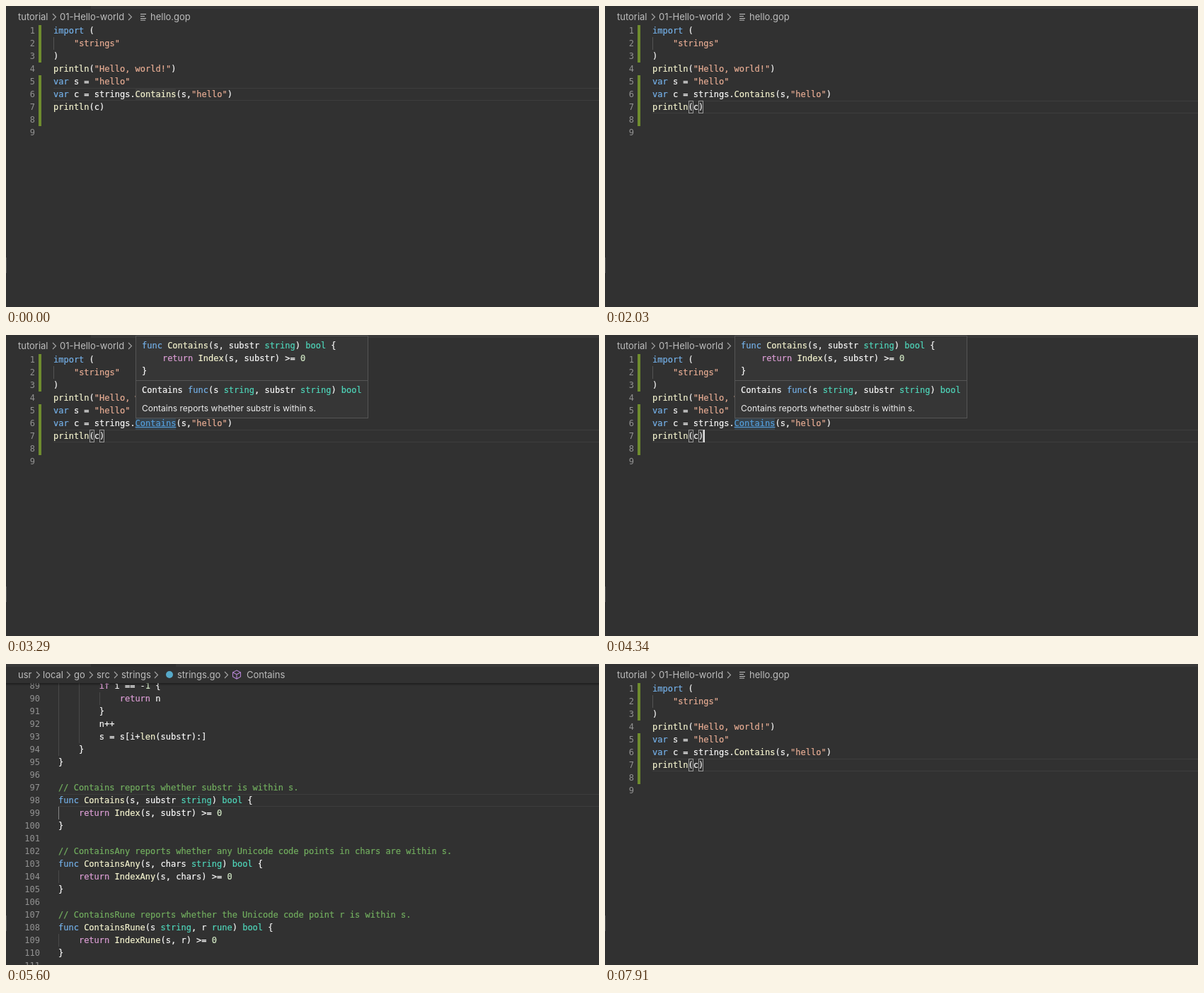
An HTML page that plays this animation: 838x426 px, repeating every 8.26 s.

```html
<!DOCTYPE html>
<html lang="en">
<head>
<meta charset="utf-8">
<title>Go to definition</title>
<style>
  html, body { margin: 0; width: 100%; height: 100%; overflow: hidden; background: #313131; }
  #stage { position: relative; width: 838px; height: 426px; overflow: hidden; background: #313131; color: #f8f8f8; }
  #stage div, #stage svg { position: absolute; }
  .line, .num { font: 12px/18px "DejaVu Sans Mono", "Liberation Mono", monospace; white-space: pre; height: 18px; }
  .line { -webkit-text-stroke: .2px; }
  .num { color: #929292; text-align: right; width: 40px; }
  .kw { color: #74b0e8; } .str { color: #e8ad94; } .fn { color: #f5f4cf; } .type { color: #4fd6ba; }
  .ctl { color: #db9dd4; } .val { color: #cfe5c2; } .com { color: #72ae5f; }
  .ui { font: 13px/18px Inter, "Open Sans", sans-serif; white-space: pre; color: #bdbdbd; }
  .link .target { color: #559fdc; text-decoration: underline; }
  .full { left: 0; top: 0; width: 838px; height: 426px; }
  .guide { width: 1px; background: #494949; }
  .bar { left: 46px; width: 4px; background: #6f8c2e; }
  #row { right: 0; height: 16px; border: solid #3d3d3d; border-width: 1px 0; }
  #word { left: 183px; top: 116px; width: 57px; height: 18px; }
  #caret { width: 2px; height: 18px; background: #dcdcdc; }
  .pair { top: 134px; width: 5px; height: 16px; border: 1px solid #9a9a9a; }
  #hover { left: 183px; top: 1px; width: 327px; height: 115px; background: #363636; border: 1px solid #555; }
  #head { left: 0; top: 0; width: 838px; height: 27px; background: #313131; }
  #shade { left: 0; top: 27px; width: 838px; height: 4px; background: linear-gradient(#0006, #0000); }
  .tab { top: 0; height: 4px; background: #3a3a3a; }
  #progress { top: 1px; width: 25px; height: 3px; background: #4b7ea6; }
  #edge { left: 0; top: 356px; width: 1px; height: 22px; background: #555; }
</style>
</head>
<body>
<div id="stage">
  <div id="row"></div>
  <div id="word"></div>
  <div id="hello" class="full">
    <div id="bars"><div class="bar" style="top:26px;height:54px"></div><div class="bar" style="top:98px;height:72px"></div></div>
    <div id="pairs"><div class="pair" style="left:118px"></div><div class="pair" style="left:132px"></div></div>
  </div>
  <div id="lib" class="full"></div>
  <div id="caret"></div>
  <div id="head">
    <div id="tabHello" class="full"></div>
    <div id="tabLib" class="full"></div>
    <div id="crumbHello" class="full"></div>
    <div id="crumbLib" class="full"></div>
    <div id="crumbFn" class="full"></div>
  </div>
  <div id="shade"></div>
  <div id="progress"></div>
  <div id="hover"></div>
  <div id="edge"></div>
</div>
<script>
const LOOP = 8260, CHAR = 7.224, ROW = 18;
const $ = id => document.getElementById(id);

const helloCode = `import (
    "strings"
)
println("Hello, world!")
var s = "hello"
var c = strings.Contains(s,"hello")
println(c)

`;

const libCode = `        if i == -1 {
            return n
        }
        n++
        s = s[i+len(substr):]
    }
}

// Contains reports whether substr is within s.
func Contains(s, substr string) bool {
    return Index(s, substr) >= 0
}

// ContainsAny reports whether any Unicode code points in chars are within s.
func ContainsAny(s, chars string) bool {
    return IndexAny(s, chars) >= 0
}

// ContainsRune reports whether the Unicode code point r is within s.
func ContainsRune(s string, r rune) bool {
    return IndexRune(s, r) >= 0
}
`;

const rules = [
  ["com", "\\/\\/.*"], ["str", '"[^"]*"'], ["kw", "\\b(?:import|var|func)\\b"],
  ["ctl", "\\b(?:if|return)\\b"], ["type", "\\b(?:string|bool|rune)\\b"],
  ["fn", "\\b\\w+(?=\\()"], ["val", "\\b\\d+\\b"]
];
const lexer = new RegExp(rules.map(([name, re]) => `(?<${name}>${re})`).join("|"), "g");

function paint(text) {
  return text.replace(/>/g, "\u0001").replace(lexer, (m, ...rest) => {
    const groups = rest[rest.length - 1];
    const name = rules.find(([n]) => groups[n] !== undefined)[0];
    return `<span class="${name}">${m}</span>`;
  }).replace(/\u0001/g, "&gt;");
}

function add(parent, cls, left, top, html = "", css = "") {
  const el = document.createElement("div");
  el.className = cls;
  el.style.cssText = `left:${left}px;top:${top}px;${css}`;
  el.innerHTML = html;
  parent.append(el);
  return el;
}

function addCode(parent, code, first, top, numRight, left) {
  code.split("\n").forEach((text, i) => {
    const y = top + i * ROW;
    add(parent, "num", numRight - 40, y, first + i);
    add(parent, "line", left, y, paint(text));
  });
}

const guide = (parent, x, from, rows, color = "") =>
  add(parent, "guide", x, from, "", `height:${rows * ROW}px;` + (color && `background:${color}`));

// Editor pages
addCode($("hello"), helloCode, 1, 26, 41, 67);
guide($("hello"), 67, 44, 1, "#555");
const target = [...$("hello").querySelectorAll(".fn")].find(e => e.textContent === "Contains");
target.classList.add("target");

const lineTop = n => n < 20 ? 26 + (n - 1) * ROW : 166 + (n - 97) * ROW;
addCode($("lib"), libCode, 89, lineTop(89), 48, 74);
guide($("lib"), 74, lineTop(89), 6);
guide($("lib"), 103, lineTop(89), 5);
guide($("lib"), 132, lineTop(90), 1);
guide($("lib"), 74, lineTop(99), 1, "#858585");
guide($("lib"), 74, lineTop(104), 1);
guide($("lib"), 74, lineTop(109), 1);

// Breadcrumbs
const svg = (x, y, w, h, color, d) =>
  `<svg style="left:${x}px;top:${y}px" width="${w}" height="${h}" fill="none" stroke="${color}" stroke-width="1.1"><path d="${d}"/></svg>`;
const label = (parent, x, text) => add(parent, "ui", x, 6, text);
const arrow = (parent, x) => parent.insertAdjacentHTML("beforeend", svg(x - 3, 10, 7, 11, "#a8a8a8", "M1 1L5.5 5.5L1 10"));

function crumbs(parent, names, arrows) {
  names.forEach(([x, text]) => label(parent, x, text));
  arrows.forEach(x => arrow(parent, x));
}
crumbs($("crumbHello"), [[17, "tutorial"], [76, "01-Hello-world"], [204, "hello.gop"]], [68, 175]);
$("crumbHello").insertAdjacentHTML("beforeend",
  svg(189, 10, 10, 11, "#c4c4c4", "M1 1.5H9M1 4.5H7M1 7.5H9M1 10H8"));
crumbs($("crumbLib"), [[17, "usr"], [52, "local"], [96, "go"], [128, "src"], [163, "strings"], [242, "strings.go"]],
  [45, 88, 120, 155, 212]);
add($("crumbLib"), "", 226, 10, "", "width:10px;height:10px;border-radius:50%;background:#56a9c9");
crumbs($("crumbFn"), [[340, "Contains"]], [311]);
$("crumbFn").insertAdjacentHTML("beforeend",
  svg(319, 8, 14, 14, "#b283d0", "M7 1L12.5 3.8V10L7 13L1.5 10V3.8ZM1.5 3.8L7 6.8L12.5 3.8M7 6.8V13"));

// Tab strip: the gap is the open tab
const strip = (parent, left, width) => add(parent, "tab", left, 0, "", `width:${width}px`);
strip($("tabHello"), 120, 718);
strip($("tabLib"), 0, 120);
strip($("tabLib"), 240, 598);

// Hover card
["func Contains(s, substr string) bool {", "    return Index(s, substr) >= 0", "}"]
  .forEach((text, i) => add($("hover"), "line", 8, 4 + i * ROW, paint(text)));
add($("hover"), "", 0, 62, "", "width:327px;height:1px;background:#555");
add($("hover"), "line", 8, 67, paint("Contains func(s string, substr string) bool"));
add($("hover"), "ui", 8, 93, "Contains reports whether substr is within s.", "font-size:12px;color:#eee");

// Caret moves: time, line, column
const moves = [[-930, 6, 20], [1330, 7, 10], [4550, 6, 20], [4970, 98, 5], [6370, 6, 20], [7340, 7, 10]];
const show = (id, on) => { $(id).style.visibility = on ? "inherit" : "hidden"; };
const within = (t, a, b) => t >= a && t < b;

function draw(t) {
  const [since, line, col] = moves.filter(m => m[0] <= t).pop();
  const inLib = within(t, 4970, 6370), libHead = within(t, 4830, 6370), loading = within(t, 4830, 4970);
  const left = inLib ? 74 : 67, top = lineTop(line);

  show("hello", !inLib);
  show("lib", inLib);
  show("shade", inLib);
  show("tabHello", !inLib);
  show("tabLib", inLib);
  show("crumbHello", !libHead);
  show("crumbLib", libHead);
  show("crumbFn", within(t, 5180, 6370));
  show("bars", !within(t, 6370, 6790));
  show("pairs", line === 7);
  show("hover", within(t, 2730, 4550));

  show("row", !loading);
  $("row").style.left = left + "px";
  $("row").style.top = top + "px";

  show("caret", Math.floor((t - since) / 500) % 2 === 0);
  $("caret").style.left = Math.floor(left + col * CHAR) + "px";
  $("caret").style.top = top + "px";

  const link = within(t, 2590, 4970);
  $("hello").classList.toggle("link", link);
  show("word", link || t < 1330 || within(t, 6860, 7340));
  $("word").style.background = !link ? "#3b3b3b" : t < 4550 ? "#36434d" : "#48545e";

  show("progress", loading);
  $("progress").style.left = 17 + (t - 4900) * 0.2 + "px";
}

const start = performance.now();
function tick() {
  draw((performance.now() - start) % LOOP);
  requestAnimationFrame(tick);
}
tick();
</script>
</body>
</html>
```
